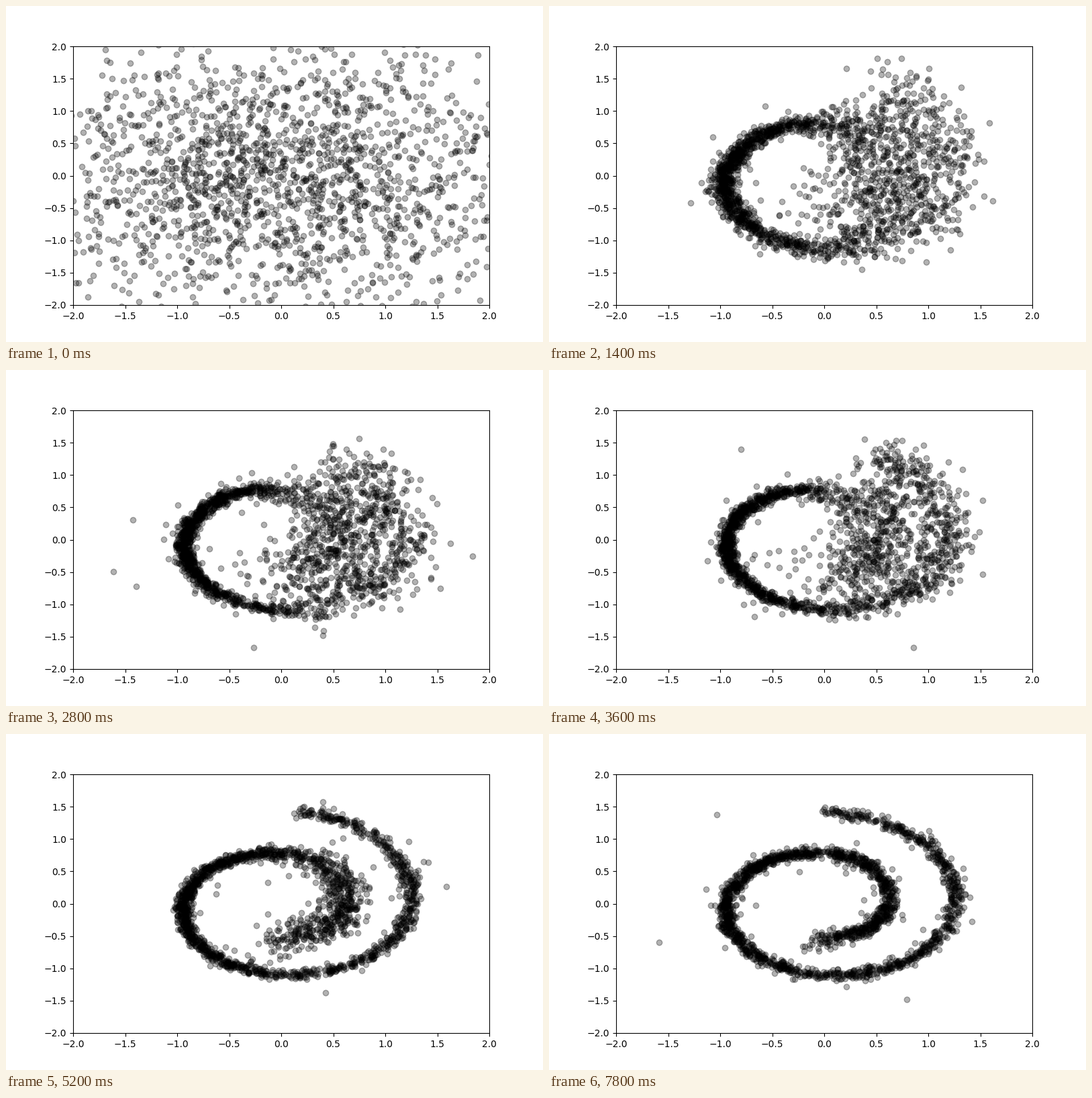
Write a matplotlib script that moves like this. It is 800 px wide and 500 px high and loops after 8000 ms.

```python
import numpy as np
import matplotlib.pyplot as plt
from matplotlib.animation import FuncAnimation

PI = np.pi
COUNT = 2000
FRAMES = 40
INTERVAL = 200
CENTRE = np.array([0.5, 0.08])


def ramp(v, lo, hi):
    u = np.clip((v - lo) / (hi - lo), 0, 1)
    return u * u * (3 - 2 * u)


def mix(a, b, u):
    return a + (b - a) * u


def sample_t(rng, crowd):
    """Positions along the spiral, crowded around its left bend."""
    t = rng.uniform(1.5 * PI, 4.5 * PI, COUNT)
    bend = rng.normal(3 * PI, 0.85, COUNT)
    t = np.where(rng.random(COUNT) < crowd, bend, t)
    return np.clip(t, 1.5 * PI, 4.5 * PI)


def spiral(t, learned, rng):
    # the outer end starts short and bulged, then stretches out
    far = 3.7 * PI
    s = np.where(t > far, far + (t - far) * mix(0.84, 1, learned), t)
    x = 0.1 * s * np.cos(s)
    y = 0.1 * s * np.sin(s)
    y *= 1 + 0.12 * (1 - learned) * ramp(s, 4 * PI, 4.35 * PI)

    # loose straight tail at the inner end
    tail = np.clip((5.3 - t) / 0.6, 0, 1) ** 2 * rng.exponential(0.13, COUNT)
    return np.column_stack([x - tail, y - tail])


def cloud(k):
    rng = np.random.default_rng(700 + k)
    if k == 0:
        return rng.normal([-0.04, -0.08], [1.28, 1.08], (COUNT, 2))

    # the left bend settles first, then the outer arm, then the inner one
    haze = 0.3 * np.exp(-k / 2.5)
    learned_out = ramp(k, 10, 26)
    learned_in = ramp(k, 12, 34)

    t = sample_t(rng, mix(0.27, 0.13, learned_in))
    inner = 1 - ramp(t, 2.22 * PI, 2.65 * PI)
    outer = ramp(t, 3.42 * PI, 3.75 * PI)
    p = spiral(t, learned_in, rng)

    # unsettled arms are drawn together, mostly sideways
    pull = (0.24 * (1 - learned_in) * inner
            + 0.22 * (1 - learned_out) * outer)
    p += pull[:, None] * [1, 0.3] * (CENTRE - p)

    # slow distortion of the whole curve
    sway = 0.05 * np.exp(-k / 14)
    phase = rng.uniform(0, 2 * PI, 2)
    p += sway * np.sin(0.9 * t[:, None] + phase)

    core = 0.04 + haze
    sigma = (core + (mix(0.26, 0.045, learned_in) - 0.04) * inner
             + (mix(0.20, 0.042, learned_out) - 0.04) * outer)

    # a few strays, fewer still far away
    luck = rng.random(COUNT)
    sigma = np.where(luck < 0.06, np.minimum(2.6 * sigma, sigma + 0.12), sigma)
    sigma = np.where(luck < 0.008, 0.42, sigma)
    return p + rng.normal(0, 1, (COUNT, 2)) * sigma[:, None]


fig, ax = plt.subplots(figsize=(8, 5), dpi=100)
ax.set_xlim(-2, 2)
ax.set_ylim(-2, 2)
dots = ax.scatter(*cloud(0).T, color="black", alpha=0.3)


def update(k):
    dots.set_offsets(cloud(k))
    return (dots,)


anim = FuncAnimation(fig, update, frames=FRAMES, interval=INTERVAL,
                     repeat=True, repeat_delay=0)
plt.show()
```
